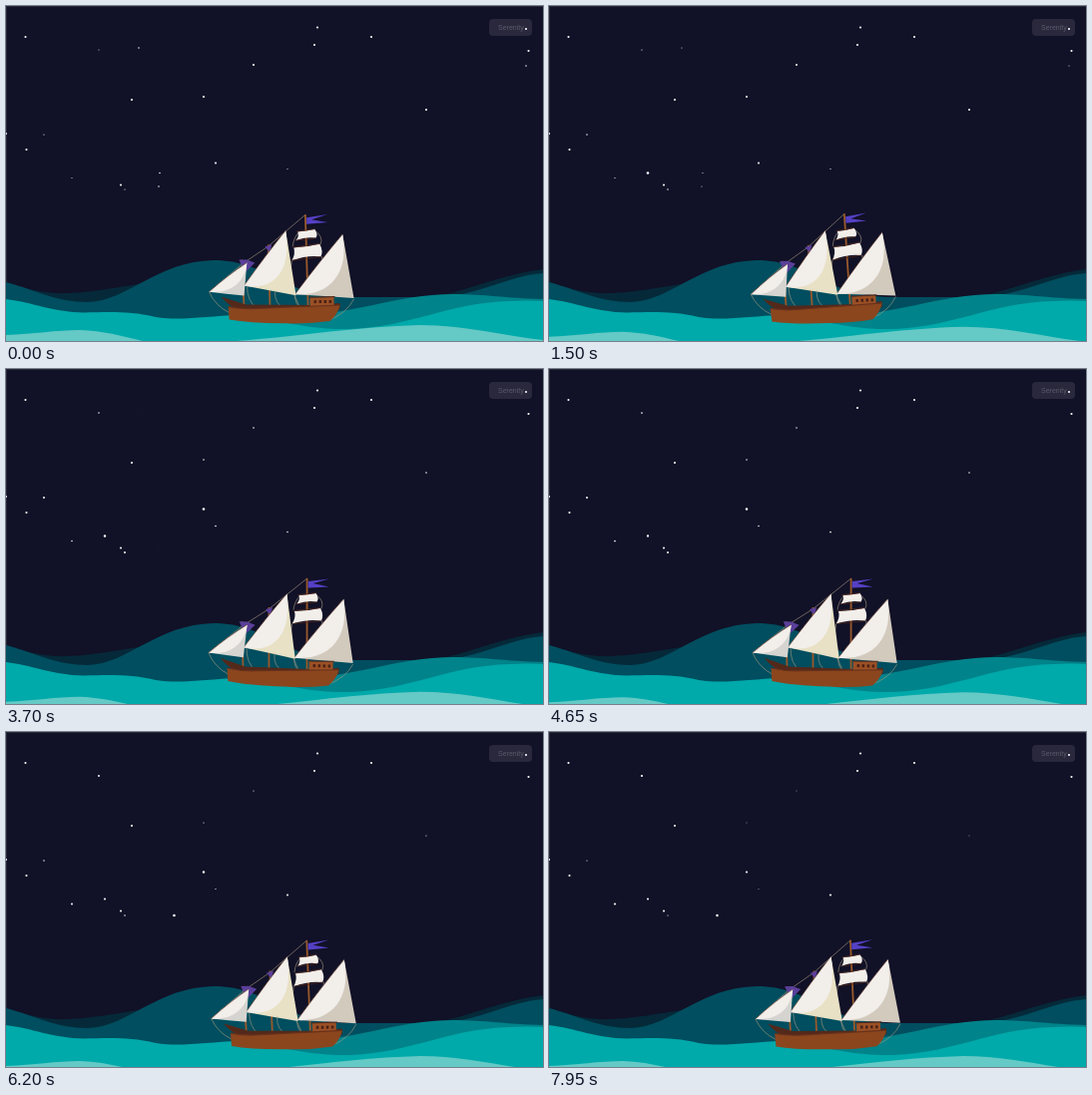
Animation, 538 px wide and 336 px high, one loop 8 s. Source, as an HTML page with a canvas:

```html
<!DOCTYPE html>
<html lang="en">
<head>
<meta charset="utf-8">
<title>Night sail</title>
<style>
  html, body { margin: 0; width: 100%; height: 100%; overflow: hidden; background: #111127; }
  canvas { display: block; }
</style>
</head>
<body>
<canvas id="stage" width="538" height="336"></canvas>
<script>
const LOOP = 8000, TAU = Math.PI * 2;
const ctx = document.getElementById('stage').getContext('2d');
const rope = '#a99b83', wood = '#9a592b', dark = '#53291b', purple = '#5540c5';

// Each group of stars shares one rule for its radius; u runs from 0 to 1 over the loop
const starGroups = [
  { radius: () => 1.05, at: [[19.5, 31], [312, 21.5], [309, 39], [366, 31], [126, 94],
    [523.5, 45], [521, 23], [0, 128], [20.5, 144], [115, 179.5]] },
  { radius: u => 1.1 - .65 * u, at: [[248, 59], [198, 91], [421, 104], [210, 157.5]] },
  { radius: u => .75 - 1.3 * u, at: [[133, 42], [521, 60], [154, 167.5], [153, 181]] },
  { radius: u => .5 + .6 * u, at: [[93, 44], [282, 163.5], [66, 172.5]] },
  { radius: u => .8 - .2 * Math.cos(TAU * u), at: [[38, 129], [119, 184]] }
];
const newStars = [[99, 167.5], [198, 140.5], [168.5, 184]];

function fill(color, d) {
  ctx.fillStyle = color;
  ctx.fill(new Path2D(d));
}

function line(color, d, width = .6) {
  ctx.strokeStyle = color;
  ctx.lineWidth = width;
  ctx.stroke(new Path2D(d));
}

function dot(x, y, r) {
  ctx.beginPath();
  ctx.arc(x, y, Math.max(0, r), 0, TAU);
  ctx.fill();
}

const mix = (a, b, k) => a.map((v, i) => v + (b[i] - v) * k);

// Triangular sail: shaded body with a lit belly
function sail(top, tack, clew, shade) {
  const [x, y] = mix(top, tack, .5);
  const luff = `Q${x + 1} ${y - 3} ${top}Z`;
  fill(shade, `M${top}L${clew}Q${mix(clew, tack, .5)} ${tack}${luff}`);
  fill('#f2eeea', `M${top}C${mix(top, clew, .65)} ${mix(clew, tack, .45)} ${tack}${luff}`);
  line(dark, `M${top}Q${x + 1} ${y - 3} ${tack}`);
}

// Square sail hanging between two yards
function squareSail(x, y, w, h) {
  const slope = w * .14;
  fill('#f2eeea', `M${x} ${y}Q${x + w / 2} ${y} ${x + w} ${y - slope}q4 ${h * .6} 1 ${h}
    q${-w / 2} -2 ${-w - 3} ${slope}Q${x + 2} ${y + h / 2} ${x} ${y}Z`);
  line(dark, `M${x - 1} ${y}L${x + w} ${y - slope}M${x - 2} ${y + h}l${w + 3} ${-slope}`, .8);
}

function drawSky(t) {
  ctx.fillStyle = '#111127';
  ctx.fillRect(0, 0, 538, 336);
  ctx.fillStyle = '#292936';
  ctx.fillRect(0, 0, 538, 1);
  ctx.fillRect(0, 0, 1, 336);

  ctx.fillStyle = '#29283c';
  ctx.beginPath();
  ctx.roundRect(484, 13, 43, 17, 4);
  ctx.fill();
  ctx.fillStyle = '#5c5b6c';
  ctx.font = '7px "Liberation Sans", Arial, sans-serif';
  ctx.fillText('Serenity', 493, 24);

  ctx.fillStyle = '#fff';
  for (const { radius, at } of starGroups) {
    for (const [x, y] of at) dot(x, y, radius(t / LOOP));
  }
  newStars.forEach(([x, y], i) => {
    const age = t - 900 - 2450 * i;
    if (age > 0) dot(x, y, Math.min(1, age / 250) * (1.3 - age / 25000));
  });
}

const wave = (color, crest) => fill(color, `${crest}V350H0Z`);

function drawSea() {
  wave('#052939', 'M0 277C22 284 38 289 64 288C95 286 110 282 140 278L400 298C460 288 492 270 538 264');
  wave('#004e5f', 'M0 277C30 285 50 297 82 297C122 296 151 256 208 255C264 255 276 292 345 292H430C474 291 500 271 538 268');
  wave('#00838a', 'M0 336C130 314 185 314 274 313C350 310 390 289 448 289C480 289 500 293 538 294');
  wave('#00a9aa', 'M0 294C26 297 46 307 78 307.5C106 307 124 306 150 312C176 316 200 311 234 310C268 311 290 325 345 324C410 321 440 298 505 296Q522 295 538 296');
}

function drawFoam(t) {
  ctx.save();
  ctx.translate(0, 5 * Math.sin(Math.PI * t / 14000));
  fill('#65c9c5', `M0 330C28 329 50 325 74 325C100 326 120 332 145 338H0Z
    M200 338C290 333 340 322 415 320C460 320 500 331 538 335V338Z`);
  ctx.restore();
}

function drawShip(t) {
  const roll = TAU * (t / 6000 - .19);
  const degrees = -2 * Math.cos(roll) - .6 * Math.cos(2 * roll);
  const drift = 1.5 - 2.4 * Math.cos(TAU * (t - 2200) / 12000);
  ctx.save();
  ctx.translate(275.5 + drift, 289.8);
  ctx.rotate(degrees * Math.PI / 180);
  ctx.translate(-275.5, -289.5);

  line(rope, 'M300 209L262 241L238 257L203 286Q209 300 223 307M348 294Q341 308 323 315');
  line(wood, 'M299.8 209L302 300M262.5 239L264 304M236 254L238 303', 1.8);
  fill(purple, 'M301 212L322 209L306 214L322 217L301 218.5Z');
  fill('#5a3f9a', 'M259 241L266 239L264 247ZM233 254L241 254L249 257L239 267Z');
  line(rope, 'M293 227Q288 232 287 241M309 225Q318 231 315 239M286 255Q281 279 293 300M316 251Q317 273 325 292');
  squareSail(292, 226, 17, 9);
  squareSail(288, 242, 26, 13);

  sail([337, 229], [289, 289], [348, 293], '#d3cabe');
  sail([280, 225], [238, 280], [290, 290], '#e8e1c5');
  sail([241, 257], [203, 286], [238, 290], '#d5d4d0');
  line(rope, 'M241 280Q241 296 251 303M269 285Q268 299 279 303M289 290Q289 300 296 303');

  fill(dark, 'M215 291L240 299L310 300L334 298V304L236 306Q224 302 215 291Z');
  fill('#9b5025', 'M304 292H328V301H304Z');
  line(dark, 'M303 292L329 291.5', 1);
  for (let x = 308; x < 325; x += 5) fill('#4b2115', `M${x} 295h2.5v3h-2.5Z`);
  fill('#8b461e', 'M222 301Q236 304 252 303L334 300Q332 309 324 316Q302 319 280 318Q244 318 223 314Z');
  line('#68311b', 'M222 301Q236 304 252 303L334 300', 1.2);
  ctx.restore();
}

function frame(now) {
  const t = now % LOOP;
  drawSky(t);
  drawSea();
  drawShip(t);
  drawFoam(t);
  requestAnimationFrame(frame);
}
requestAnimationFrame(frame);
</script>
</body>
</html>
```
